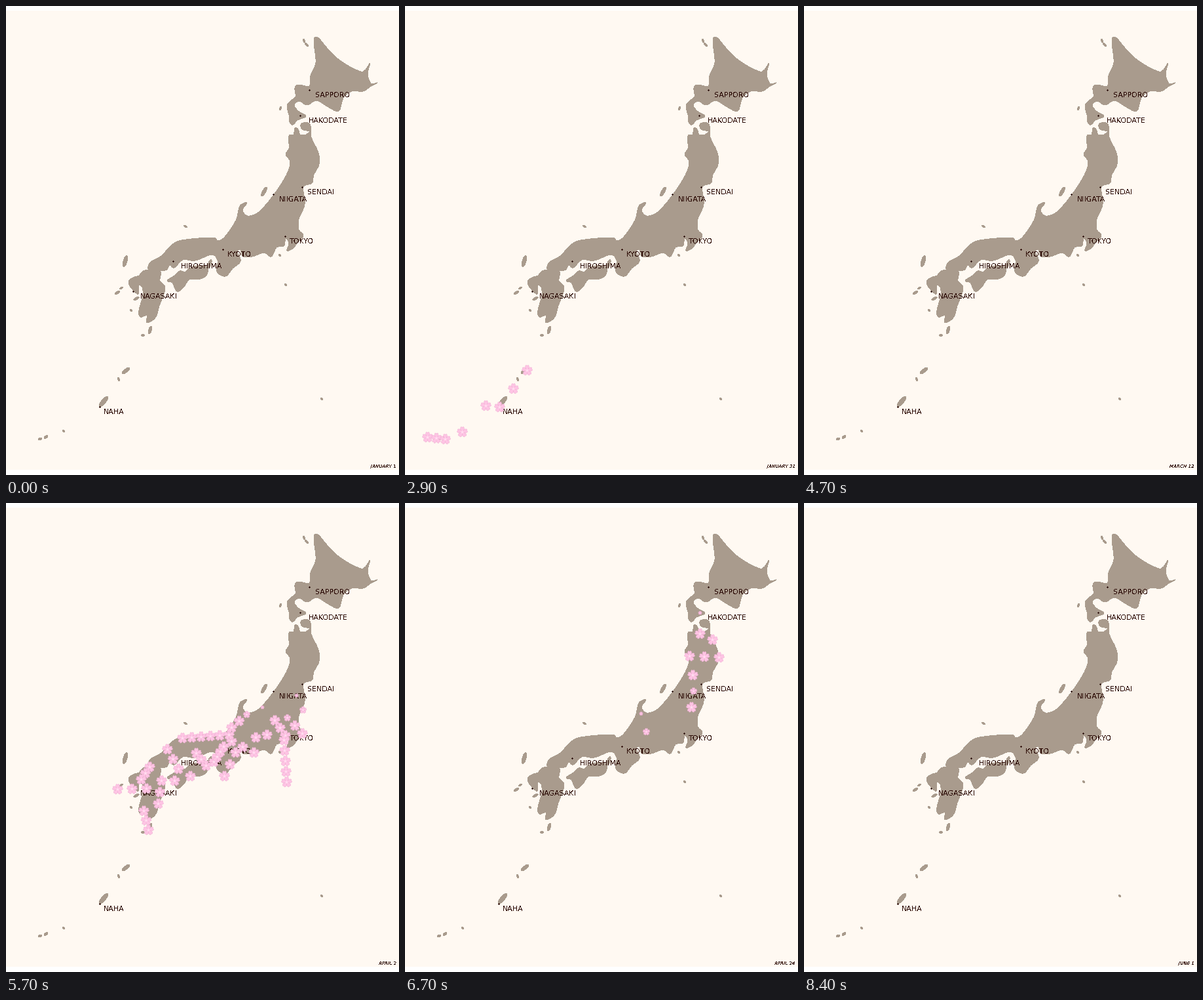
These frames come from a looping animation (600 by 715 pixels, 10 s). A matplotlib script:

```python
import numpy as np
import matplotlib.pyplot as plt
from matplotlib.animation import FuncAnimation
from matplotlib.collections import PolyCollection
from matplotlib.patches import Ellipse, Polygon, Rectangle

W, H, DPI = 600, 715, 100
PX = 72 / DPI
PAPER, LAND, INK = "#fff9f2", "#a99b8d", "#2b0a04"
PINK, PINK_EDGE, PALE = "#ffc4e4", "#f0b2d6", "#fff0f8"

plt.rcParams["font.family"] = "DejaVu Sans"
plt.rcParams["text.antialiased"] = False
fig = plt.figure(figsize=(W / DPI, H / DPI), dpi=DPI, facecolor="white")
ax = fig.add_axes([0, 0, 1, 1])
ax.set(xlim=(0, W), ylim=(H, 0))
ax.axis("off")
ax.add_patch(Rectangle((0, 7), W, 700, color=PAPER, lw=0))


def smooth(points, steps=6):
    """Closed Catmull-Rom curve through the key points."""
    b = np.array(points, float)
    a, c, d = (np.roll(b, shift, axis=0) for shift in (1, -1, -2))
    t = np.linspace(0, 1, steps, endpoint=False)[:, None, None]
    curve = b + t / 2 * (c - a + t * (2 * a - 5 * b + 4 * c - d
                                      + t * (3 * (b - c) + d - a)))
    return curve.transpose(1, 0, 2).reshape(-1, 2)


def land(*points):
    ax.add_patch(Polygon(smooth(points), fc=LAND, lw=0, aa=False))


def islet(x, y, length, tilt):
    ax.add_patch(Ellipse((x, y), length, 1.2 + length / 4, angle=-tilt,
                         fc=LAND, lw=0, aa=False))


# Hokkaido
land((476, 48), (490, 64), (506, 80), (524, 92), (542, 100), (549, 97), (556, 87),
     (552, 103), (557, 118), (567, 117), (556, 123), (545, 130), (528, 130),
     (515, 140), (508, 160), (492, 154), (474, 144), (460, 151), (448, 145),
     (440, 151), (446, 160), (458, 168), (445, 174), (438, 181), (433, 177),
     (432, 166), (429, 153), (434, 145), (442, 138), (441, 125), (446, 120),
     (463, 122), (465, 106), (473, 86), (470, 53))

# Honshu, clockwise from the northern tip
land((441, 186), (446, 188), (449, 196), (458, 196), (463, 191), (452, 188),
     (451, 179), (464, 180), (466, 200), (477, 224), (478, 241), (470, 257),
     (467, 270), (454, 276), (456, 302), (447, 325), (447, 341), (454, 350),
     (445, 360), (439, 369), (429, 373), (432, 362), (427, 354), (424, 366),
     (413, 368), (405, 382), (394, 376), (376, 382), (362, 382), (358, 372),
     (353, 375), (358, 389), (346, 400), (335, 412), (322, 405), (323, 388),
     (314, 379), (289, 388), (270, 387), (257, 399), (250, 395), (243, 403),
     (219, 403), (220, 391), (237, 381), (256, 362), (275, 356), (316, 353),
     (323, 358), (334, 352), (351, 327), (357, 305), (368, 300), (361, 311),
     (369, 320), (386, 314), (408, 289), (428, 258), (434, 238), (427, 226),
     (432, 217), (432, 198), (439, 196))

# Shikoku
land((246, 419), (257, 411), (265, 404), (274, 405), (285, 397), (306, 397),
     (307, 409), (297, 416), (280, 417), (271, 429), (261, 435), (254, 422))

# Kyushu
land((187, 421), (194, 414), (203, 411), (212, 403), (235, 404), (235, 419),
     (243, 430), (234, 457), (228, 475), (215, 483), (215, 472), (205, 474),
     (203, 464), (209, 442), (208, 429), (203, 426), (202, 439), (193, 432))

for place in [(394, 283, 15, 60), (274, 336, 5, -30), (182, 389, 17, 75),
              (170, 437, 8, 35), (176, 430, 5, 30), (311, 393, 13, 70),
              (199, 446, 9, 30), (455, 53, 6, -60), (459, 59, 6, -50),
              (419, 156, 5, 70), (220, 494, 12, 75), (209, 502, 6, 0),
              (183, 556, 14, 38), (172, 569, 5, -70), (149, 603, 19, 50),
              (52, 660, 6, 10), (61, 657, 7, 35), (88, 648, 4, -20)]:
    islet(*place)
for x, y in [(427, 425), (418, 380), (482, 599), (191, 464)]:
    islet(x, y, 3, -45)

for name, x, y, gap in [("SAPPORO", 463, 128, 9), ("HAKODATE", 449, 167, 13),
                        ("SENDAI", 452, 276, 8), ("NIIGATA", 408, 287, 9),
                        ("TOKYO", 426, 351, 7), ("KYOTO", 331, 371, 7),
                        ("HIROSHIMA", 255, 389, 12), ("NAGASAKI", 194, 435, 11),
                        ("NAHA", 143, 611, 6)]:
    ax.text(x + gap, y + 11, name, size=11 * PX, color=INK)
    ax.add_patch(Rectangle((x - 1, y), 3, 1, color=INK, lw=0, aa=False))
    ax.add_patch(Rectangle((x, y - 1), 1, 3, color=INK, lw=0, aa=False))

flowers = []


def opening(y):
    """Frame at which the blossom front, moving north, reaches height y."""
    if y > 540:
        return round(np.interp(y, [555, 657], [20, 25]))
    return round(np.interp(y, [50, 120, 167, 199, 262, 293, 325, 360, 440],
                           [71, 70, 67, 63, 60, 57, 55.6, 54, 51]))


def trail(count, start, end, delay=0):
    for x, y in np.linspace(start, end, count):
        first = opening(y) + delay
        flowers.append((x, y, first, first + (12 if y > 540 else 8)))


# Southern islands
trail(3, (34, 657), (61, 660))
trail(2, (87, 649), (123, 609))
trail(3, (144, 611), (186, 555))
# Kyushu
trail(3, (219, 402), (206, 421))
trail(3, (170, 436), (214, 435))
trail(3, (237, 423), (232, 458))
trail(3, (210, 469), (217, 498))
# Inland Sea and Kansai
trail(3, (263, 405), (246, 375))
trail(2, (257, 423), (281, 416))
trail(3, (290, 381), (305, 400))
trail(4, (317, 394), (332, 371))
trail(3, (350, 380), (333, 416))
trail(3, (344, 363), (378, 380))
# Sea of Japan side
trail(6, (269, 358), (340, 353))
trail(3, (344, 342), (367, 322))
trail(2, (360, 302), (391, 311), 1)
# Kanto and the Pacific side
trail(3, (410, 331), (426, 354))
trail(5, (424, 361), (428, 425))
trail(3, (429, 327), (452, 351))
trail(2, (398, 353), (381, 357))
trail(2, (453, 315), (443, 293))
# Late mountain towns
trail(2, (368, 339), (437, 311), 4)
# Tohoku
trail(2, (440, 277), (439, 262))
trail(3, (434, 233), (479, 235))
trail(2, (450, 199), (469, 208))
# Hokkaido
trail(3, (450, 167), (463, 128))
trail(4, (443, 136), (486, 106))
trail(3, (496, 155), (532, 99))
trail(3, (469, 98), (475, 51))
trail(2, (538, 127), (559, 119), 4)

theta = np.linspace(0, 2 * np.pi, 100, endpoint=False)
offset = (theta + np.pi / 5) % (2 * np.pi / 5) - np.pi / 5
radius = 0.3 + 0.7 * np.cos(2.5 * offset) ** 0.5 - 0.22 * np.exp(-(offset / 0.12) ** 2)
ring = np.column_stack([np.sin(theta), -np.cos(theta)])
petals = 8.6 * radius[:, None] * ring
heart = (0.6 + 2 * np.cos(2.5 * offset) ** 6)[:, None] * ring

blossoms = ax.add_collection(PolyCollection([], facecolors=PINK, edgecolors=PINK_EDGE,
                                            linewidths=0.4, zorder=5))
hearts = ax.add_collection(PolyCollection([], facecolors=PALE, linewidths=0, zorder=6))
date_label = ax.text(596, 704, "", size=7.2 * PX, color=INK, ha="right", style="italic")

months = [("JANUARY", 31), ("FEBRUARY", 28), ("MARCH", 31), ("APRIL", 30),
          ("MAY", 31), ("JUNE", 30)]
FRAMES, HOLD, STEPS, LAST_DAY = 100, 15, 69, 151


def date_text(frame):
    day = LAST_DAY * min(max(frame - HOLD, 0), STEPS) // STEPS
    for name, length in months:
        if day < length:
            return f"{name} {day + 1}"
        day -= length


def update(frame):
    placed = []
    for x, y, first, fall in flowers:
        opened = np.clip((frame - first + 1) / 3, 0, 1)
        fallen = np.clip((frame - fall + 1) / 3, 0, 1)
        size = opened * (1 - fallen)
        if size > 0.01:
            placed.append((size, np.array([x + 0.5, y + 0.5 + 28 * fallen])))
    blossoms.set_verts([petals * s + p for s, p in placed])
    hearts.set_verts([heart * s + p for s, p in placed])
    date_label.set_text(date_text(frame))
    return blossoms, hearts, date_label


anim = FuncAnimation(fig, update, frames=FRAMES, interval=100, repeat=True,
                     repeat_delay=0, blit=False)
plt.show()
```
